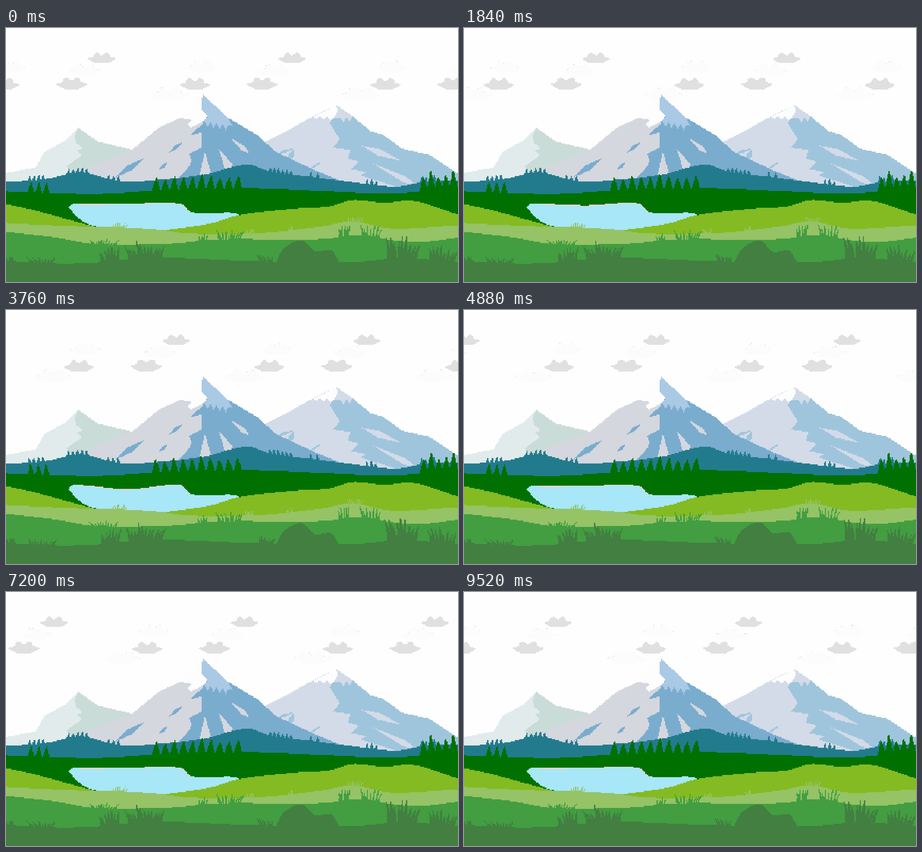
Animation, 998 px wide and 561 px high, one loop 9600 ms. Source, as an HTML page with a canvas:

```html
<!DOCTYPE html>
<html lang="en">
<head>
<meta charset="utf-8">
<title>Mountain lake</title>
<style>
html, body { margin: 0; width: 100%; height: 100%; overflow: hidden; background: #fefefe; }
canvas { display: block; width: 998px; height: 561px; image-rendering: pixelated; }
</style>
</head>
<body>
<canvas id="stage" width="427" height="240"></canvas>
<script>
const W = 427, H = 240, S = W / 998;
const STEP = 80, STEPS = 120;
const LAP = 180 / S, DRIFT = LAP / STEPS;
const view = document.getElementById('stage').getContext('2d');
const hills = document.createElement('canvas');
hills.width = W;
hills.height = H;
let g = hills.getContext('2d');

const C = {
  mist: '#e1ebec', sage: '#cadcd7', stone: '#d4d7de', blue: '#7aacce',
  ice: '#a9c9e5', snow: '#fdfdfe', pale: '#d3dbe8', sky: '#9fc5dc',
  teal: '#227b8d', pine: '#007100', olive: '#84bb22', lime: '#95c366',
  grass: '#429e41', front: '#427f41', lake: '#a7e7f7',
  cloud: '#e0e0e0', wisp: '#fcfcfc', spark: '#dceff2'
};

function random(seed) {
  let n = seed * 7919 + 13;
  return () => {
    n = (n * 16807 + 11) % 2147483647;
    return n / 2147483647;
  };
}

// Smooth height curve through a few x, y pairs.
function curve(...k) {
  const n = k.length / 2;
  const slope = i => {
    const a = Math.max(0, i - 1), b = Math.min(n - 1, i + 1);
    return (k[2 * b + 1] - k[2 * a + 1]) / (k[2 * b] - k[2 * a]);
  };
  return x => {
    let i = 0;
    while (i < n - 2 && x > k[2 * i + 2]) i++;
    const w = k[2 * i + 2] - k[2 * i], t = Math.min(1, Math.max(0, (x - k[2 * i]) / w));
    const y0 = k[2 * i + 1], y1 = k[2 * i + 3], u = 1 - t;
    return y0 * u * u * (1 + 2 * t) + y1 * t * t * (3 - 2 * t)
      + w * t * u * (slope(i) * u - slope(i + 1) * t);
  };
}

// Column fill between two height curves.
function band(color, top, bottom, x0 = 0, x1 = 998) {
  g.fillStyle = color;
  for (let i = Math.max(0, Math.round(x0 * S)); i < Math.min(W, Math.round(x1 * S)); i++) {
    const x = (i + 0.5) / S, y = Math.round(top(x) * S);
    g.fillRect(i, y, 1, Math.max(0, Math.round(bottom(x) * S) - y));
  }
}
const floor = () => 561;

// Hard-edged polygon fill.
function poly(color, ...p) {
  const n = p.length;
  g.fillStyle = color;
  for (let row = 0; row < H; row++) {
    const y = (row + 0.5) / S, hits = [];
    for (let i = 0; i < n; i += 2) {
      const j = (i + 2) % n;
      if ((p[i + 1] <= y) !== (p[j + 1] <= y)) {
        hits.push(p[i] + (p[j] - p[i]) * (y - p[i + 1]) / (p[j + 1] - p[i + 1]));
      }
    }
    hits.sort((a, b) => a - b);
    for (let i = 0; i < hits.length; i += 2) {
      const a = Math.round(hits[i] * S);
      g.fillRect(a, row, Math.round(hits[i + 1] * S) - a, 1);
    }
  }
}

// Kite-shaped streak, widest at the given share of its length.
function shard(color, x0, y0, x1, y1, width, at = 0.6) {
  const dx = x1 - x0, dy = y1 - y0, k = width / 2 / Math.hypot(dx, dy);
  const mx = x0 + dx * at, my = y0 + dy * at;
  poly(color, x0, y0, mx - dy * k, my + dx * k, x1, y1, mx + dy * k, my - dx * k);
}

// Points of a saw-toothed line, start and end included.
function teeth(x0, y0, x1, y1, count, depth) {
  const p = [];
  for (let i = 0; i <= count * 2; i++) {
    const t = i / count / 2;
    p.push(x0 + (x1 - x0) * t, y0 + (y1 - y0) * t + (i % 2) * depth);
  }
  return p;
}

function drawMountains() {
  const leftRidge = [159, 220, 203, 251, 250, 262, 300, 274, 300, 345];
  poly(C.mist, 0, 345, 0, 320, 65, 308, 85, 274, 130, 249, ...leftRidge);
  poly(C.sage, 150, 345, 134, 305, 168, 281, 156, 271, 170, 266, 155, 254, 152, 240, ...leftRidge);

  const rightRidge = [729, 170, 765, 195, 805, 228, 833, 236, 875, 267, 935, 280, 998, 322, 998, 354];
  poly(C.pale, 600, 354, 572, 252, 630, 222, 672, 198, ...rightRidge);
  poly(C.sky, 860, 350, 782, 325, 796, 318, 762, 312, 778, 295, 755, 288, 760, 270,
    722, 264, 737, 246, 715, 211, 720, 200, ...rightRidge.slice(2));
  poly(C.pale, 729, 170, 720, 200, ...teeth(738, 199, 766, 195, 2, 10));
  poly(C.snow, 729, 170, 733, 183, 722, 200, ...teeth(716, 203, 670, 200, 3, -6));
  shard(C.pale, 785, 260, 872, 293, 15, 0.45);
  shard(C.pale, 808, 298, 905, 347, 14, 0.75);
  shard(C.sky, 637, 266, 624, 293, 12);
  shard(C.sky, 638, 266, 598, 278, 7);
  shard(C.sky, 697, 295, 672, 311, 5);

  const mainRidge = [434, 146, 490, 198, 555, 237, 595, 273, 680, 313, 740, 338, 740, 345];
  poly(C.stone, 80, 345, 180, 307, 280, 268, 335, 222, 384, 198, ...mainRidge);
  poly(C.blue, 380, 345, 380, 332, 405, 305, 410, 292, 404, 278, 433, 264, 433, 231,
    406, 237, 434, 212, ...mainRidge);
  poly(C.ice, 434, 146, 490, 198, 500, 217, ...teeth(492, 214, 438, 204, 4, 14), 446, 194, 432, 180);
  poly(C.snow, 434, 146, 432, 180, 446, 194, 435, 206, 407, 221, 402, 212, 410, 203, 384, 198);
  shard(C.stone, 439, 272, 441, 331, 28, 0.94);
  shard(C.stone, 470, 268, 496, 312, 20, 0.85);
  shard(C.stone, 496, 243, 537, 277, 12, 0.7);
  shard(C.blue, 392, 250, 358, 277, 8, 0.5);
  shard(C.blue, 307, 286, 240, 331, 14, 0.5);
  shard(C.blue, 357, 296, 337, 314, 7, 0.5);
}
drawMountains();

function cloud(color, cx, cy, w, h) {
  const u = x => Math.min(1, Math.abs(x - cx) * 2 / w);
  const top = x => cy - h * (u(x) < 0.58 ? 0.4 - 0.12 * Math.cos(9 * u(x)) : 0.35 * (1 - u(x)));
  const bottom = x => cy + 2.4 + h * 0.34 * Math.min(1, (1 - u(x)) / 0.5);
  band(color, top, bottom, cx - w / 2, cx + w / 2);
  return top;
}

function drawClouds(step) {
  const rnd = random(step + 1);
  for (let lap = -2; lap < 3; lap++) {
    const x = lap * LAP + step * DRIFT;
    for (const [cx, cy, w] of [[432, 87, 66], [174, 94, 73], [361, 146, 85]]) {
      const top = cloud(C.wisp, x + cx, cy, w, 28);
      g.fillStyle = C.spark;
      for (let i = 0; i < 6; i++) {
        const sx = x + cx + (rnd() - 0.5) * w;
        g.fillRect(Math.floor(sx * S), Math.floor(top(sx) * S), 1, 1);
      }
    }
    cloud(C.cloud, x + 211, 67, 60, 24);
    cloud(C.cloud, x + 145, 123, 68, 27);
    cloud(C.cloud, x + 417, 124, 67, 26);
  }
}

// Evenly spaced firs from x0 to x1 standing on a ridge.
function grove(color, ridge, x0, x1, count, height, half, sway) {
  const rnd = random(x0);
  for (let i = 0; i < count; i++) {
    const x = x0 + (x1 - x0) * i / (count - 1), foot = ridge(x) + 3;
    const h = height * (0.8 + 0.4 * rnd()), tip = x + sway;
    poly(color, x - half, foot, x - half * 0.6, foot - h * 0.45, tip - 1.2, foot - h,
      tip + 1.2, foot - h, x + half * 0.6, foot - h * 0.5, x + half, foot);
  }
}

// Fan of bent blades whose tips spread from x0 to x1.
function tuft(color, ridge, x0, x1, count, height, width, sway) {
  const rnd = random(x0 + 5), mid = (x0 + x1) / 2;
  for (let i = 0; i < count; i++) {
    const spread = x0 + (x1 - x0) * (i + 0.3 + 0.4 * rnd()) / count;
    const x = mid + (spread - mid) * 0.75, tip = spread + sway, base = ridge(x) + 3;
    const h = (height + 3) * (0.5 + 0.5 * rnd()), bend = x + (tip - x) * 0.35, w = width / 2;
    poly(color, x - w, base, bend - w * 0.7, base - h * 0.55, tip - 1, base - h,
      tip + 1, base - h, bend + w * 0.7, base - h * 0.55, x + w, base);
  }
}

const ridge = {
  teal: curve(0, 340, 90, 333, 165, 319, 250, 338, 340, 335, 440, 323, 533, 301, 580, 316, 650, 326, 740, 337, 860, 350, 930, 338, 998, 336),
  pine: curve(0, 361, 200, 366, 350, 358, 550, 354, 700, 360, 850, 365, 998, 354),
  left: curve(0, 389, 60, 402, 130, 421, 200, 440),
  right: curve(350, 447, 450, 432, 515, 413, 640, 399, 715, 394, 765, 380, 835, 386, 900, 382, 998, 412),
  lime: curve(0, 431, 150, 438, 270, 441, 350, 447, 400, 454, 560, 453, 700, 438, 765, 427, 850, 443, 998, 436),
  grass: curve(0, 450, 110, 463, 200, 477, 360, 476, 470, 467, 700, 466, 780, 457, 850, 468, 910, 473, 998, 463),
  front: curve(0, 514, 110, 520, 200, 518, 320, 507, 555, 515, 780, 516, 870, 508, 998, 516),
  rock: curve(598, 514, 613, 488, 654, 470, 682, 494, 718, 492, 734, 515)
};
const shore = curve(138, 396, 160, 420, 190, 436, 250, 445, 350, 448, 450, 433, 514, 413);

function drawLake(c) {
  const edge = 388 + c, mid = 392 - 4 * c;
  const top = curve(138, 395, 147, edge, 175, edge, 270, mid, 385, edge - 1, 410, 407, 500, 408, 514, 412);
  band(C.stone, top, shore, 138, 514);
  band(C.lake, x => top(x) + (x > 165 && x < 410 ? 3 : 0), shore, 138, 514);
}

function drawLand(step) {
  const c = Math.cos(step / 30 * 2 * Math.PI);

  band(C.teal, ridge.teal, floor);
  for (const [a, b, n] of [[52, 82, 4], [138, 178, 5], [226, 248, 3], [583, 629, 6], [673, 688, 2], [797, 817, 3], [918, 945, 4]]) {
    grove(C.teal, ridge.teal, a, b, n, 13, 5, c);
  }
  band(C.pine, ridge.pine, floor);
  grove(C.pine, ridge.pine, 55, 89, 3, 26, 8, c);
  grove(C.pine, ridge.pine, 331, 512, 10, 31, 10, 1.5 * c);
  grove(C.pine, ridge.pine, 922, 988, 5, 39, 10, -c);

  drawLake(c);
  band(C.olive, ridge.left, floor, 0, 200);
  band(C.olive, ridge.right, floor, 350);

  band(C.lime, ridge.lime, floor);
  for (const [a, b, n] of [[232, 270, 7], [528, 548, 5], [618, 636, 4], [750, 790, 7]]) {
    tuft(C.lime, ridge.lime, a, b, n, 11, 3, c);
  }
  band(C.grass, ridge.grass, floor);
  for (const [a, b, n, h] of [[180, 252, 11, 12], [422, 446, 4, 16], [460, 528, 10, 21], [731, 762, 5, 26], [778, 832, 7, 25]]) {
    tuft(C.grass, ridge.grass, a, b, n, h, 5, 1.5 * c);
  }
  band(C.front, ridge.front, floor);
  band(C.front, x => ridge.rock(x) - c, floor, 598, 734);
  for (const [a, b, n, h] of [[-8, 25, 4, 36], [43, 115, 10, 14], [203, 255, 7, 32], [260, 356, 11, 43], [554, 595, 7, 16], [832, 916, 9, 49], [927, 998, 8, 37]]) {
    tuft(C.front, ridge.front, a, b, n, h, 4 + h / 9, (a > 800 ? 2 : -2.5) * c);
  }
}

const start = performance.now();
let last = -1;
function frame() {
  const step = Math.floor((performance.now() - start) / STEP) % STEPS;
  if (step !== last) {
    last = step;
    g = view;
    g.fillStyle = '#fefefe';
    g.fillRect(0, 0, W, H);
    drawClouds(step);
    g.drawImage(hills, 0, 0);
    drawLand(step);
  }
  requestAnimationFrame(frame);
}
frame();
</script>
</body>
</html>
```
